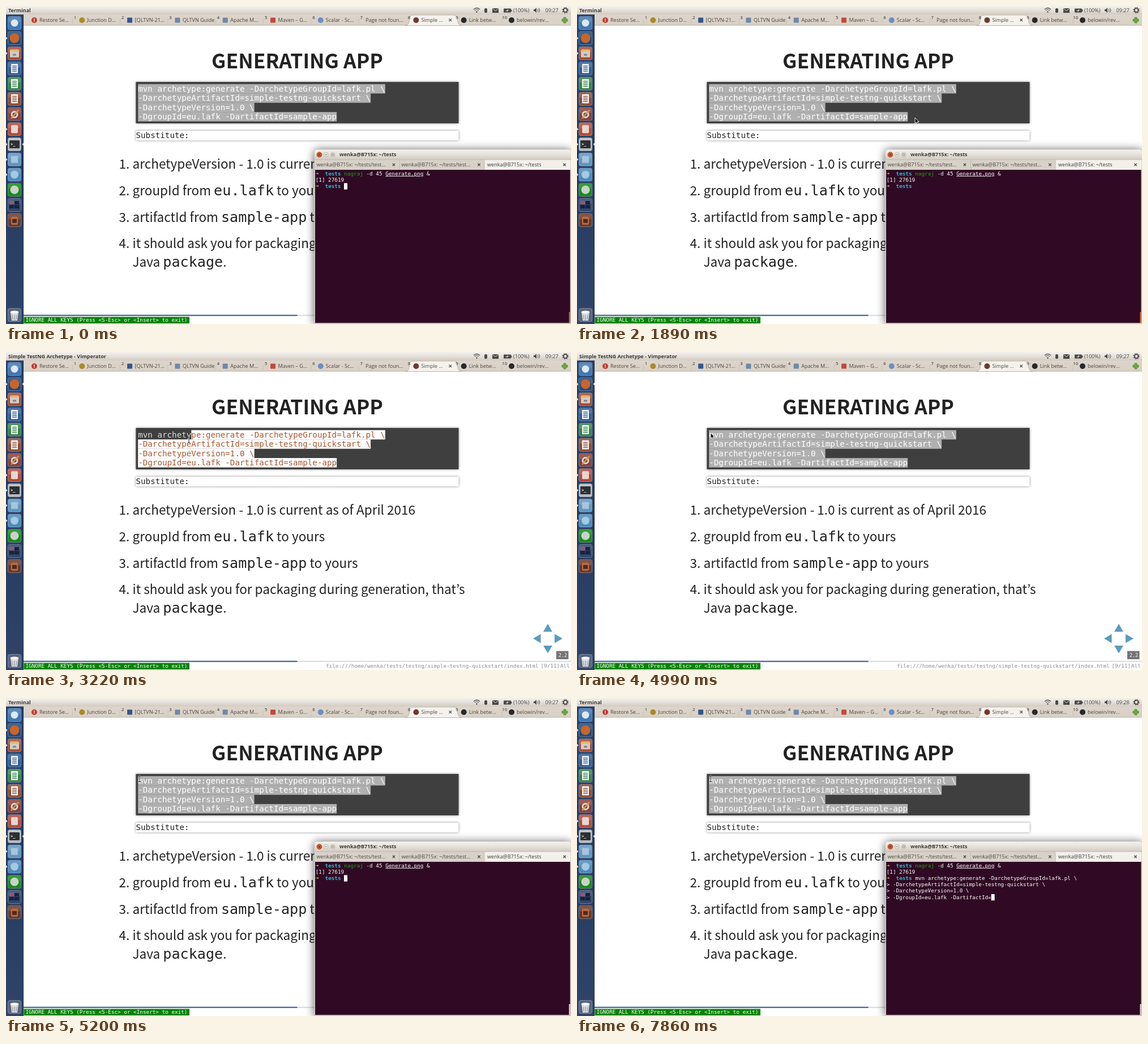
Write an HTML page that moves like this. It is 998x561 px and loops after 8000 ms.

```html
<!DOCTYPE html>
<html lang="en">
<head>
<meta charset="utf-8">
<title>Generating an app</title>
<style>
html, body { margin: 0; width: 100%; height: 100%; overflow: hidden; background: #fff; }
svg { display: block; width: 100vw; height: 100vh; }
text { white-space: pre; }
.ui { font-family: "Open Sans", "Noto Sans", sans-serif; }
.mono { font-family: "DejaVu Sans Mono", monospace; }
.slide { font-family: "Noto Sans CJK JP", "Noto Sans CJK SC", "Noto Sans CJK", sans-serif; }
.slide .mono { font-size: 25.15px; }
.b { font-weight: 700; }
#term { filter: drop-shadow(0 1px 8px rgba(0,0,0,.65)); }
</style>
</head>
<body>
<svg id="stage" viewBox="0 0 998 561" preserveAspectRatio="none"></svg>
<script>
const esc = s => s.replace(/&/g, '&amp;').replace(/</g, '&lt;');
const R = (x, y, w, h, fill, more = '') => `<rect x="${x}" y="${y}" width="${w}" height="${h}" fill="${fill}" ${more}/>`;
const C = (x, y, r, fill, more = '') => `<circle cx="${x}" cy="${y}" r="${r}" fill="${fill}" ${more}/>`;
const P = (d, fill, more = '') => `<path d="${d}" fill="${fill}" ${more}/>`;
const L = (d, color, w = 1) => P(d, 'none', `stroke="${color}" stroke-width="${w}"`);
const T = (x, y, s, size, fill, cls = 'ui', more = '') =>
  `<text x="${x}" y="${y}" font-size="${size}" fill="${fill}" class="${cls}" ${more}>${esc(s)}</text>`;
const G = (id, body) => `<g id="${id}">${body}</g>`;
const grad = (id, ...stops) => `<linearGradient id="${id}" x2="0" y2="1">` +
  stops.map((c, i) => `<stop offset="${i / (stops.length - 1)}" stop-color="${c}"/>`).join('') + '</linearGradient>';

// ---- Desktop ----
function topBar() {
  const ink = '#4a4744';
  return R(0, 0, 998, 15, 'url(#bar)') +
    L('M826 6Q831.5 1 837 6M828 8Q831.5 5 835 8', ink, 1.2) + C(831.5, 10.5, 1.2, ink) +
    R(845, 4, 5, 8, ink, 'rx="2"') +
    R(859, 4, 11, 8, ink) + L('M859.5 4.5L864.5 8.5L869.5 4.5', '#e8e3dc') +
    R(879, 4.5, 13, 7, ink, 'rx="1"') + R(892, 6.5, 1.5, 3, ink) + P('M882 8H885V6L889 8H886V10Z', '#e8e3dc') +
    T(896, 10.8, '(100%)', 9.1, ink) +
    P('M932 6H934L937 3V12L934 9H932Z', ink) + L('M939 5Q941 7.5 939 10M941 3.5Q944.5 7.5 941 11.5', ink) +
    C(988, 7.5, 3.3, 'none', `stroke="${ink}" stroke-width="1.8"`) +
    C(988, 7.5, 4.8, 'none', `stroke="${ink}" stroke-width="1.5" stroke-dasharray="1.9 1.87"`) +
    `<text id="title" x="4" y="10.8" font-size="9.05" fill="#3c3b37" class="ui b"></text>` +
    `<text id="clock" x="952.5" y="10.8" font-size="9.1" fill="${ink}" class="ui"></text>`;
}

function tabBar() {
  const names = ['Restore Se…', 'Junction D…', '[QLTVN-21…', 'QLTVN Guide', 'Apache M…', 'Maven – G…',
    'Scalar - Sc…', 'Page not foun…', 'Simple …', 'Link betw…', 'belowin/rev…'];
  const colors = ['#c53a2f', '#a88b24', '#31588d', '#6d88ad', '#6d88ad', '#c4483c', '#6b8fc4', '', '#71392d', '#26282b', '#26282b'];
  let s = R(31, 15, 967, 19, 'url(#tabs)') + R(31, 33.5, 967, 1, '#b9afa4') +
    P('M705 34.5Q711 34 712 28L713 20Q714 16 719 16H791Q796 16 797 20L798 28Q799 34 805 34.5Z', '#f5f2ee', 'stroke="#b3a99f" stroke-width=".8"');
  names.forEach((name, i) => {
    const x = 31 + 84.3 * i;
    if (colors[i]) s += [2, 3, 4, 5].includes(i)
      ? R(x + 14.5, 20.5, 9, 9, colors[i], 'rx="1"') : C(x + 19, 25, 5, colors[i]);
    if (i && i != 8 && i != 9) s += L(`M${x + 2} 22V32`, '#c6beb4', .8);
    s += T(i == 7 ? 635 : x + 28, 28.2, name, 9.1, '#4c4640');
    if (i < 10) s += T(x + 91, 22.5, String(i + 1), 7.8, '#222', 'ui', 'text-anchor="middle"');
  });
  return s + T(50, 28, '!', 8, '#fff', 'ui b', 'text-anchor="middle"') +
    L('M782.5 22.5L787 27M787 22.5L782.5 27', '#55504b', 1.2) +
    P('M985 20H989V23H992V27H989V30H985V27H982V23H985Z', '#67a93c', 'stroke="#4c8527" stroke-width=".7"');
}

function launcher() {
  const tiles = ['#3f78b5', '#214b78', '#a74b35', '#315f97', '#35854a', '#8e4c36', '#86413c', '#b34c3c',
    '#b8bbbe', '#5f97c4', '#4c8bbd', '#168a1b', '#33456a', '#653a2d'];
  let s = R(0, 15, 31, 546, 'url(#dock)') + R(30, 15, 1, 546, '#1e2c49');
  tiles.forEach((c, i) => {
    const y = 30 + 26.75 * i;
    s += R(3.5, y - 11.5, 23, 23, c, 'rx="3" stroke="#ffffff66" stroke-width=".8"') + R(4.5, y - 10.5, 21, 9, '#fff', 'rx="2" opacity=".15"');
    if (i == 0) s += C(15, y, 6.5, '#dfe8f1');
    if (i == 1) s += C(15, y, 8.5, '#c9652a');
    if (i == 2) s += R(7, y - 6, 16, 13, '#d2cdc7', 'rx="1"') + R(8, y - 7, 14, 4, '#e5b76b') + R(12, y + 1, 6, 3, '#85807b');
    if (i > 2 && i < 6) {
      s += R(9, y - 8, 12, 16, '#f5f5f5');
      for (let k = 0; k < 4; k++) s += R(11, y - 5 + 3 * k, 8, 1.4, c);
    }
    if (i == 6) s += C(15, y + 1, 5, 'none', 'stroke="#d8d8d8" stroke-width="3"') + L(`M9 ${y + 8}L22 ${y - 7}`, '#d99a4b', 2.5);
    if (i == 7) s += R(9, y - 7, 12, 14, '#e6d6d0', 'rx="2"');
    if (i == 8) s += R(6, y - 7, 18, 14, '#2d3032', 'rx="1"') + T(8, y + 2, '>_', 7, '#fff', 'mono b');
    if (i == 9) s += R(9, y - 6, 12, 12, '#a9c4da');
    if (i == 10) s += C(15, y, 7, '#a6c8e0');
    if (i == 11) s += C(15, y, 7.5, '#c9d3c7');
    if (i == 12) s += R(6, y - 7, 8, 6, '#8a5a78') + R(15, y - 7, 8, 6, '#17233d') + R(6, y, 8, 6, '#17233d') + R(15, y, 8, 6, '#17233d');
    if (i == 13) s += R(9, y - 6, 12, 14, '#c36a3a', 'rx="2"') + R(11, y - 2, 8, 7, '#4b2a22');
    if ([1, 2, 7, 8, 9, 10].includes(i)) s += P(`M0 ${y - 2.5}L2.5 ${y}L0 ${y + 2.5}Z`, '#e7e7e7');
  });
  return s + R(3.5, 533.5, 23, 23, '#56657f', 'rx="3" stroke="#ffffff66" stroke-width=".8"') +
    P('M8 540H22L20 555H10Z', '#d8dadb') + `<ellipse cx="15" cy="540" rx="7.5" ry="2.5" fill="#f6f6f6"/>` +
    L('M11 545L12 553M15 545V554M19 545L18 553', '#8f9499') + P('', '#e7e7e7', 'id="mark"');
}

// ---- Slide ----
const item = (y, html, num = '') => T(199.4, y, num, 22.55, 'inherit', '') +
  `<text x="223.5" y="${y}" font-size="22.55">${html}</text>`;
const tt = s => `<tspan class="mono">${s}</tspan>`;

function slide() {
  const shadow = 'style="filter:drop-shadow(0 0 2px rgba(0,0,0,.45))"';
  const list = [[286.6, 500], [334, 341], [381, 398], [426.8, 592], [460.3, 166]];
  const html = ['archetypeVersion - 1.0 is current as of April 2016', `groupId from ${tt('eu.lafk')} to yours`,
    `artifactId from ${tt('sample-app')} to yours`, 'it should ask you for packaging during generation, that’s',
    `Java ${tt('package')}.`];
  return R(31, 34, 967, 527, '#fff') +
    T(514.5, 109.5, 'GENERATING APP', 35.4, '#222', 'slide b', 'text-anchor="middle"') +
    R(229.5, 134, 570, 73, '#3f3f3f', shadow) + G('code', '') +
    R(229.5, 220, 570, 17, '#fff', shadow) + T(229.5, 233, 'Substitute:', 14.22, '#222', 'mono') +
    G('marks', list.map(([y, w]) => R(224, y - 23, w, 31, '#b8623a')).join('')) +
    '<g id="list" class="slide">' + list.map(([y], i) => item(y, html[i], i < 4 ? `${i + 1}.` : '')).join('') + '</g>' +
    P('M957 479.5L965 493.5H949ZM957 531.5L949 518H965ZM931 505.5L944.5 497.5V513.5ZM983 505.5L969 497.5V513.5Z', '#5b9bbf') +
    R(972, 527.5, 21.5, 14.5, '#747474') + T(976, 538, '2.2', 8.3, '#fff', 'mono') +
    R(31, 544.7, 967, 2.2, '#d9dce2') + R(31, 544.7, 483.5, 2.2, '#4169a5') +
    R(31.5, 548.5, 292.5, 11.5, '#078307') +
    T(34.5, 557.4, 'IGNORE ALL KEYS (Press <S-Esc> or <Insert> to exit)', 9.32, '#fff', 'mono') +
    T(565, 557.4, 'file:///home/wenka/tests/testng/simple-testng-quickstart/index.html', 9.32, '#8d8d8d', 'mono') +
    T(944.5, 557.4, '[9/11]', 9.32, '#8d8d8d', 'mono') + T(979, 557.4, 'All', 9.32, '#8d8d8d', 'mono');
}

const code = ['mvn archetype:generate -DarchetypeGroupId=lafk.pl \\',
  '-DarchetypeArtifactId=simple-testng-quickstart \\', '-DarchetypeVersion=1.0 \\',
  '-DgroupId=eu.lafk -DartifactId=sample-app'];
const CW = 8.561;

// Text from character `from` to the end is selected.
function codeText(from, focused) {
  const [back, ink] = focused ? ['#fff', '#a9562f'] : ['#b0b0b0', '#fff'];
  let start = 0;
  return code.map((line, i) => {
    const y = 150.8 + 16.43 * i, cut = Math.max(0, Math.min(line.length, from - start)), x = 233.2 + cut * CW;
    start += line.length;
    let s = T(233.2, y, line.slice(0, cut), 14.22, '#dcdcdc', 'mono');
    if (i == 2 && cut > 21) s = T(233.2, y, line.slice(0, 19), 14.22, '#dcdcdc', 'mono') +
      T(233.2 + 19 * CW, y, '1.0', 14.22, '#8cd0d3', 'mono') + T(233.2 + 23 * CW, y, '\\', 14.22, '#dcdcdc', 'mono');
    return s + (cut < line.length ? R(x, y - 13, (line.length - cut) * CW, 16.5, back) +
      T(x, y, line.slice(cut), 14.22, ink, 'mono') : '');
  }).join('');
}

// ---- Terminal ----
const TW = 5.612, col = n => 546.7 + n * TW, row = n => 298.8 + 11.17 * n;
const shell = (n, r, s, fill = '#fff', cls = 'mono', more = '') => T(col(n), row(r), s, 9.32, fill, cls, more);
const prompt = r => shell(0, r, '➜', '#d0bd3c', 'mono b') + shell(3, r, 'tests', '#3bb5cf', 'mono b');

function terminal() {
  const close = x => L(`M${x - 2.2} 277.8L${x + 2.2} 282.2M${x + 2.2} 277.8L${x - 2.2} 282.2`, '#4d4944', 1.3);
  const user = 'wenka@B715x: ~/tests';
  return P('M544.5 561V258Q544.5 253 549.5 253H993Q998 253 998 258V561Z', '#d9d3cb') +
    P('M545 271V258Q545 253.5 549.5 253.5H993Q998 253.5 998 258V271Z', 'url(#bar)') +
    C(553.5, 262.3, 4.5, '#d4572b', 'stroke="#8a3d20" stroke-width=".7"') + L('M551.8 260.6L555.2 264M555.2 260.6L551.8 264', '#5b2411') +
    C(565.3, 262.3, 4, '#e9e4dd', 'stroke="#aaa49b" stroke-width=".7"') + L('M563.5 262.3H567', '#777') +
    C(577.2, 262.3, 4, '#e9e4dd', 'stroke="#aaa49b" stroke-width=".7"') + R(575.5, 260.8, 3.4, 3, 'none', 'stroke="#777" stroke-width=".8"') +
    T(589, 265.4, user, 9, '#3c3b37', 'ui b') +
    R(545, 271, 453, 18, '#d8d1c8') + R(845, 271, 152, 18, '#f3f0ec') +
    L('M545 271H998M695 272V289M845 272V289', '#b9b1a7', .8) +
    T(548.5, 283.2, user + '/test…', 9.1, '#4c4640') + T(698.5, 283.2, user + '/test…', 9.1, '#4c4640') + T(850, 283.2, user, 9.1, '#3c3b37') +
    close(685) + close(835.5) + close(986.5) +
    R(546, 289, 450.5, 270, '#300a24') + R(546, 559, 451, 2, '#c9c2ba') +
    prompt(0) + shell(9, 0, 'nagraj', '#23a012') + shell(16, 0, '-d 45') +
    shell(22, 0, 'Generate.png', '#fff', 'mono', 'text-decoration="underline"') + shell(35, 0, '&') +
    shell(0, 1, '[1] 27619') + prompt(2) + G('typed', '') + R(994.5, 540, 2, 19, '#e06b3c', 'id="scroll"');
}

const erased = [[6820, 1], [7320, 2], [7370, 4], [7430, 5], [7480, 7], [7530, 9], [7860, 10]];
function typed(t) {
  let s = '', n = 9, r = 2;
  if (t >= 5700) {
    const cut = erased.reduce((k, [at, len]) => t >= at ? len : k, 0);
    const last = t < 5760 ? '' : code[3].slice(0, code[3].length - cut);
    s = shell(9, 2, code[0]) + [code[1], code[2], last].map((x, i) => shell(0, 3 + i, '> ' + x)).join('');
    n = 2 + last.length;
    r = 5;
  }
  const blank = t >= 690 && t < 1300 || t >= 1890 && t < 2130 || t >= 6070 && t < 6670;
  return s + (blank ? '' : R(col(n) - .2, row(r) - 8.7, 6, 11.2, '#fff'));
}

// ---- Window switcher ----
function switcher() {
  const tile = (x, fill) => R(x, 234, 95, 93, fill, 'rx="6" stroke="#7d8fa8" stroke-width="1.2"') +
    P(`M${x + 2} 236H${x + 93}V248Q${x + 45} 268 ${x + 2} 252Z`, '#fff', 'opacity=".2"');
  const tilted = (x, y1, w, y2, h1, h2, fill) => P(`M${x} ${y1}L${x + w} ${y2}V${y2 + h2}L${x} ${y1 + h1}Z`, fill,
    'stroke="#4a70ad" stroke-width="1.5" stroke-linejoin="round"');
  const smudge = R(228, 221, 84, 16, '#4273b0', 'rx="7"') + R(190, 322, 115, 16, '#536f92', 'rx="7"') +
    R(284, 240, 24, 90, '#4273b0', 'rx="8"') + R(410, 322, 150, 12, '#4273b0', 'rx="6"') +
    [284, 404, 520, 638].map(x => R(x, 273, 28, 16, '#536f92', 'rx="7"')).join('');
  return R(68.5, 212.5, 860, 144.5, '#a0a2a3', 'rx="6"') +
    R(74.5, 218.5, 848, 133.5, '#5b9dbf', 'rx="4" stroke="#d9e0e4" stroke-width="1.2"') + smudge +
    tilted(103, 235, 77, 246, 91, 70, '#b0699c') + P('M103 235L180 246V252Q140 262 103 247Z', '#fff', 'opacity=".25"') +
    P('M114 255L175 258V267L114 266Z', '#eee6ec') + R(120, 273, 9, 10, '#f3edf2') +
    R(120, 299, 10, 7, '#f3edf2') + R(157, 290, 10, 7, '#f3edf2') +
    tile(190, '#c4983f') + C(237, 280, 38, '#b7552d') +
    R(303, 226, 108, 107, '#b9cfdb', 'rx="15" opacity=".6"') + R(308, 231, 98, 98, '#dfe6ea', 'rx="11" opacity=".9"') +
    R(312, 235, 90, 90, '#c7cdd1', 'rx="8"') +
    R(319, 253, 73, 55, '#2f3335', 'rx="2" stroke="#e4e6e7" stroke-width="2"') + P('M321 255H390V272L321 290Z', '#fff', 'opacity=".12"') +
    R(317, 309, 77, 6, '#8b9094') + L('M332 269L343 276L332 283', '#fff', 3) + R(346, 284, 13, 3, '#fff') +
    tile(426, '#ae513a') + P('M446 257H503L508 277H441Z', '#75706b') + R(449, 260, 51, 15, '#e5aa4a') +
    L('M450 264H499M448 269H501', '#fff0c8', 1.5) + R(442, 276, 65, 41, '#c5c5c3', 'rx="2" stroke="#858583"') +
    R(465, 287, 18, 14, '#f2f2f2', 'rx="2" stroke="#777" stroke-width="2"') + R(470, 293, 8, 3, '#777') +
    tile(544.5, '#3e70b6') + C(592, 281, 35, '#6fa2cf') +
    tile(663.5, '#a9b3bd') + R(678, 250, 64, 64, '#5689b8') +
    tilted(768, 247, 75, 236, 67, 90, '#b0553f') + R(778, 253, 44, 52, '#e5dfdb', 'rx="7"') +
    tilted(845, 250, 59, 238, 61, 86, '#14870f') + C(871, 281, 23, '#555b55') +
    T(355.5, 345, 'Terminal', 8, '#fff', 'ui b', 'text-anchor="middle"');
}

// ---- Pointer ----
const path = [[440, 145, 47], [1140, 664, 161], [1300, 664, 161], [1890, 597, 197], [2660, 597, 197], [2950, 666, 150],
  [3219, 666, 150], [3220, 323, 155], [3590, 238, 145], [3840, 238, 145], [4000, 236, 142.5]];
function pointerAt(t) {
  const i = path.findIndex(p => p[0] > t);
  if (i < 1) return path[i ? path.length - 1 : 0].slice(1);
  const [a, x, y] = path[i - 1], [b, u, v] = path[i];
  const k = (t - a) / (b - a), e = k * k * (3 - 2 * k);
  return [x + (u - x) * e, y + (v - y) * e];
}
const pointer = P('M0 0V10L2.3 8L4 11.5L5.6 10.7L4 7.4H7Z', '#111', 'id="arrow" stroke="#fff" stroke-width=".9"') +
  G('beam', L('M-2 -5H2M0 -5V5M-2 5H2', '#fff', 2) + L('M-2 -5H2M0 -5V5M-2 5H2', '#111', 1));

stage.innerHTML = '<defs>' + grad('bar', '#f4f1ed', '#e5e0d9', '#d3cbc1') + grad('tabs', '#ddd5cb', '#d8d0c5') +
  grad('dock', '#28436f', '#273b60', '#2f4468') + '</defs>' +
  slide() + launcher() + tabBar() + topBar() + G('term', terminal()) + G('switch', switcher()) + G('pointer', pointer);

const el = id => document.getElementById(id);
const show = (id, on) => el(id).style.display = on ? '' : 'none';
const put = (id, html) => { const e = el(id); if (e.last !== html) e.innerHTML = e.last = html; };

// First selected character of the command; 164 means none.
function selection(t, x) {
  if (t < 2660) return 0;
  if (t < 2800) return 164;
  if (t < 2950) return t < 2850 ? 143 : t < 2900 ? 99 : 70;
  return Math.max(0, Math.round((x - 233) / CW));
}

function draw(t) {
  const inTerm = t < 2130 || t >= 5150, [x, y] = pointerAt(t);
  const marked = t >= 2710 && t < 2800;
  const beam = t >= 2710 && t < 4000 || t >= 5150;
  put('title', inTerm ? 'Terminal' : 'Simple TestNG Archetype - Vimperator');
  put('clock', t < 5930 ? '09:27' : '09:28');
  put('code', codeText(selection(t, x), t >= 2240 && t < 4990));
  show('marks', marked);
  el('list').setAttribute('fill', marked ? '#fff' : '#222');
  el('mark').setAttribute('d', inTerm ? 'M31 241.5L28.5 244L31 246.5Z' : 'M31 54L28.5 56.5L31 59Z');
  show('term', inTerm);
  put('typed', typed(t));
  el('scroll').setAttribute('fill', t < 5150 ? '#e06b3c' : '#ece7e4');
  show('switch', t >= 5040 && t < 5200);
  el('switch').style.opacity = t < 5090 ? .6 : t < 5150 ? 1 : .4;
  show('pointer', t >= 440);
  show('arrow', !beam);
  show('beam', beam);
  el('pointer').setAttribute('transform', `translate(${x} ${y})`);
}

const begin = performance.now();
(function tick() {
  draw((performance.now() - begin) % 8000);
  requestAnimationFrame(tick);
})();
</script>
</body>
</html>
```
